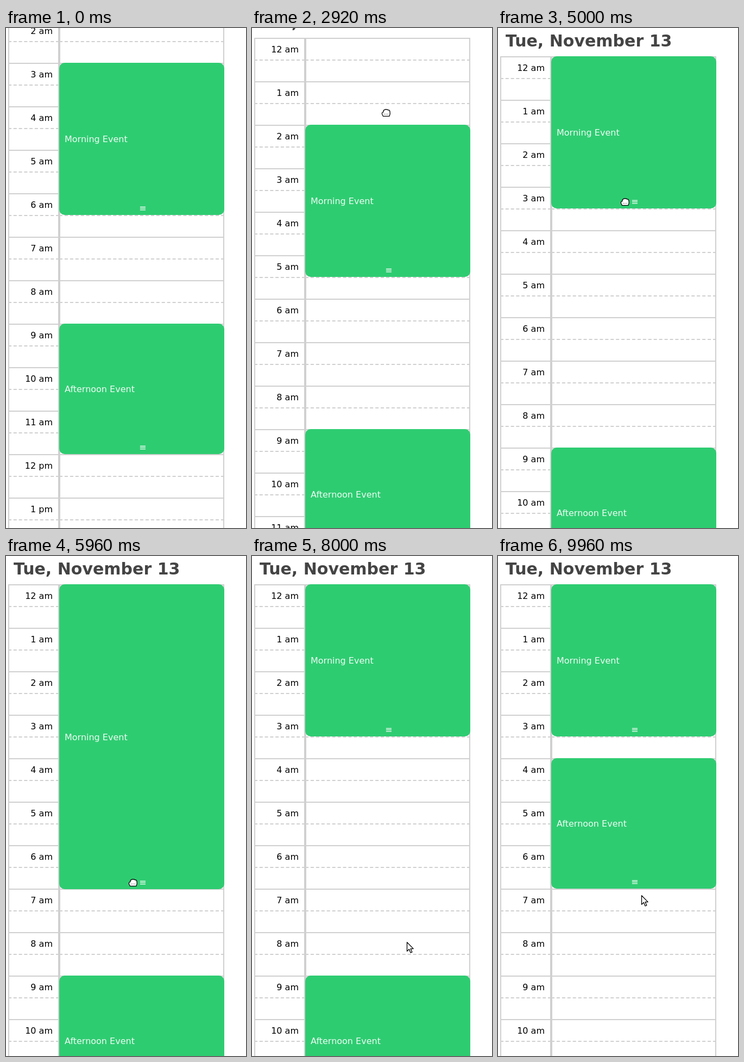
An HTML page that plays this animation: 442 by 920 pixels, repeating every 10000 ms.

```html
<!DOCTYPE html>
<html lang="en">
<head>
<meta charset="utf-8">
<title>Day calendar</title>
<style>
  html, body { margin: 0; width: 100%; height: 100%; overflow: hidden; background: #fff; }
  body { position: relative; font: 16px/39px "DejaVu Sans", sans-serif; white-space: nowrap; }
  #page, #page div, svg { position: absolute; }
  #page { left: 0; top: 0; }
  #page .title { left: 14px; top: 6px; font-size: 30px; line-height: 35px; font-weight: bold; color: #444; }
  .cell { box-sizing: border-box; height: 40px; border: solid #d0d0d0; border-width: 2px 2px 0; }
  .time { left: 4px; width: 94px; padding-right: 10px; text-align: right; }
  .slot { left: 98px; width: 304px; }
  .half { border-top-style: dashed; }
  .event { left: 98px; width: 304px; border-radius: 10px; background: #2ecc71; color: rgba(255, 255, 255, .92); }
  .event .name { left: 10px; top: calc(50% - 20px); line-height: 41px; }
  .event .handle { left: 147px; bottom: 3px; line-height: 19px; }
  svg { left: 0; top: 0; overflow: visible; fill: #fff; stroke: #000; stroke-width: 1.3; stroke-linejoin: round; }
</style>
</head>
<body>
<div id="page"><div class="title">Tue, November 13</div></div>
<svg id="arrow" width="1" height="1">
  <path d="M.5 .7V17.2L4.4 13.6 7.1 20 9.8 18.8 7.1 12.6H12.2Z"/>
</svg>
<svg id="fist" width="1" height="1">
  <path d="M-5.5 6.3Q-8 3 -7.6 .6 -7.2 -1.2 -5 -1.4 -5.4 -5 -3.2 -5 -2 -7 0 -5.8 2 -7 3.2 -5 6.5 -5.4 7 -2.2 8 2 6 6.3Z"/>
  <path stroke-width="1" stroke-dasharray="1 2" d="M-3.5 2.5H5"/>
</svg>
<script>
const LOOP = 10000, STEP = 40, TOP = 52, ROW = 40;
const page = document.getElementById("page");
const arrow = document.getElementById("arrow");
const fist = document.getElementById("fist");

function box(parent, className, text = "") {
  const node = document.createElement("div");
  node.className = className;
  node.textContent = text;
  return parent.appendChild(node);
}

function buildGrid() {
  for (let row = 0; row < 48; row++) {
    const hour = row / 2, half = row % 2 ? " half" : "";
    const label = half ? "" : `${hour % 12 || 12} ${hour < 12 ? "am" : "pm"}`;
    const cells = [box(page, "cell time" + half, label), box(page, "cell slot" + half)];
    for (const cell of cells) cell.style.top = `${TOP + row * ROW}px`;
  }
}

function createEvent(name, top, height) {
  const node = box(page, "event");
  box(node, "name", name);
  box(node, "handle", "≡");
  return { node, start: { top, height } };
}

const mix = (a, b, p) => a + (b - a) * p;

function ease(t, from, to) {
  const p = to > from ? Math.min(1, Math.max(0, (t - from) / (to - from))) : 1;
  return p * p * (3 - 2 * p);
}

const rest = (from, x, y, more) => ({ from, to: from, x, y, ...more });
const drag = (from, to, x, y, event, key, value, swing = () => 0) =>
  ({ from, to, x, y, event, key, value, swing, hand: true });

// Resizing overshoots before it settles: down and back up, or up and back down.
const downAndUp = p => 430 * Math.sin(2 * Math.PI * p ** 2) * (1 - p ** 2);
const upAndDown = p => -160 * Math.sin(Math.PI * p);

buildGrid();
const morning = createEvent("Morning Event", 240, 280);
const afternoon = createEvent("Afternoon Event", 720, 240);

const gestures = [
  rest(280, 320, 480),
  rest(1160, 241, 206, { to: 1840 }),
  drag(1880, 2320, 251, 178, morning, "top", 160),
  rest(2920, 247, 156, { hand: true }),
  drag(3200, 3760, 245, 250, morning, "top", 0),
  drag(5000, 6720, 234, 320, morning, "height", 360, downAndUp),
  rest(6800, 238, 381),
  drag(7040, 7600, 262, 400, morning, "height", 280, upAndDown),
  rest(8000, 285, 710),
  drag(8280, 9640, 285, 800, afternoon, "top", 320),
  rest(9960, 264, 624)
];

function render(t) {
  const scroll = 228 * (1 - ease(t, 2852, 2942));
  page.style.top = `${-Math.round(scroll)}px`;

  for (const event of [morning, afternoon]) event.now = { ...event.start };
  let pointer = null;
  for (const g of gestures) {
    if (t < g.from) {
      if (pointer) {
        const p = ease(t, pointer.to, g.from);
        pointer.x = mix(pointer.x, g.x, p);
        pointer.y = mix(pointer.y, g.y, p);
        pointer.hand = pointer.hand && (t <= pointer.to || g.hand);
      }
      break;
    }
    pointer = { x: g.x, y: g.y, to: g.to, hand: g.hand };
    if (g.event) {
      const p = ease(t, g.from, g.to), before = g.event.now[g.key];
      const value = mix(before, g.value, p) + g.swing(p);
      pointer.y += value - before;
      g.event.now[g.key] = value;
    }
  }

  for (const { node, now } of [morning, afternoon]) {
    node.style.top = `${Math.round(TOP + now.top)}px`;
    node.style.height = `${Math.round(now.height)}px`;
  }
  for (const cursor of [arrow, fist]) {
    const shown = pointer && (cursor === fist) === Boolean(pointer.hand);
    cursor.style.display = shown ? "block" : "none";
    if (!shown) continue;
    cursor.style.left = `${Math.round(pointer.x)}px`;
    cursor.style.top = `${Math.round(pointer.y)}px`;
  }
}

const startTime = performance.now();
function tick() {
  const elapsed = (performance.now() - startTime) % LOOP;
  render(Math.floor(elapsed / STEP) * STEP);
  requestAnimationFrame(tick);
}
render(0);
requestAnimationFrame(tick);
</script>
</body>
</html>
```
